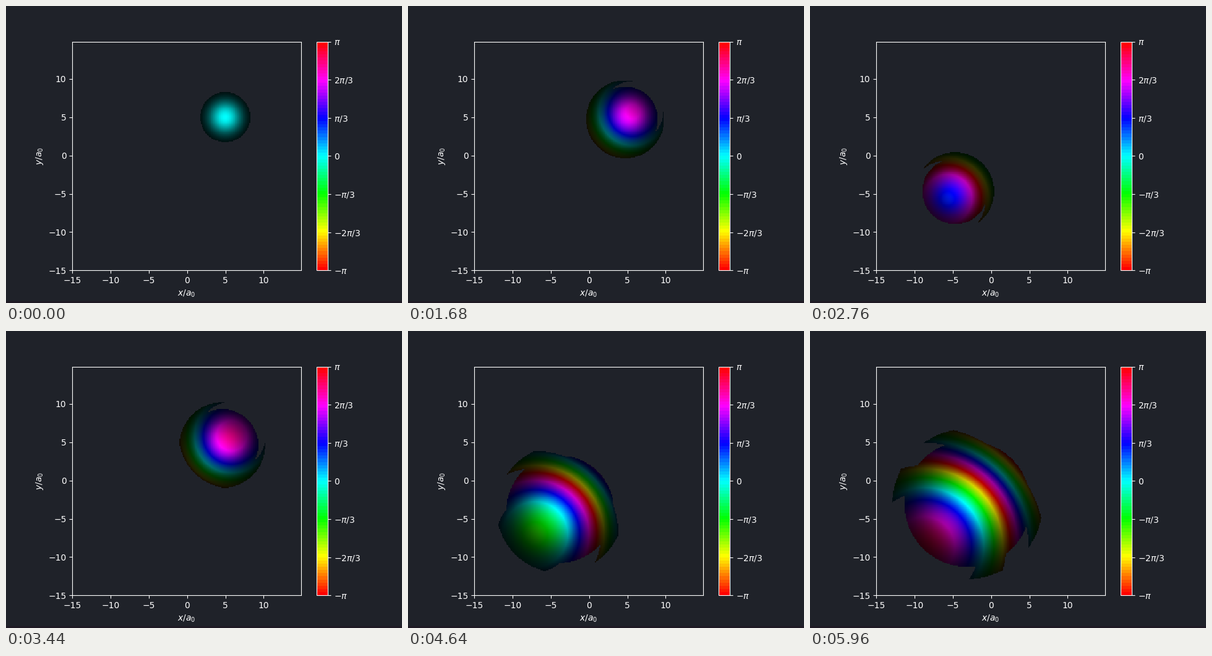
Animation of 640x480 px, one loop 6000 ms. Source, as a matplotlib script:

```python
import numpy as np
import matplotlib.pyplot as plt
from matplotlib.animation import FuncAnimation
from matplotlib.colors import ListedColormap
from matplotlib.patches import Rectangle

FRAMES, INTERVAL = 150, 40
BG = "#1f2229"

N, HALF = 256, 15.0
PERIOD = 44.4     # frames per oscillation
M_OMEGA = 0.134   # mass times angular frequency
WIDTH2 = 2.0      # squared width of the initial packet
START = 5.0       # initial x and y of the packet
KAPPA = 1 / (M_OMEGA * WIDTH2)

axis = np.linspace(-HALF, HALF, N, endpoint=False)
X, Y = np.meshgrid(axis, axis)


def hue_rgb(phase):
    """Phase to a saturated colour: 0 is cyan, +-pi is red."""
    h6 = (np.asarray(phase)[..., None] + np.pi) * 3 / np.pi
    return np.clip(np.abs((h6 + [0, 4, 2]) % 6 - 3) - 1, 0, 1)


def packet(i):
    """Modulus (peak 1) and phase of a squeezed state in a harmonic well."""
    theta = 2 * np.pi * i / PERIOD
    c, s = np.cos(theta), np.sin(theta)
    q, p = START * c, -M_OMEGA * START * s
    spread = c**2 + (KAPPA * s)**2
    curve = M_OMEGA * (KAPPA**2 - 1) * s * c / spread
    dx, dy = X - q, Y - q
    r2 = dx**2 + dy**2
    phase = p * q - np.angle(c + 1j * KAPPA * s) + p * (dx + dy) + curve * r2 / 2
    return np.exp(-r2 / (2 * WIDTH2 * spread)), phase


def render(i):
    mod, phase = packet(i)
    rgb = hue_rgb(phase)
    # dark green tones stay visible further out than red and blue ones
    cutoff = np.where(rgb[..., 1] > 0.6, 0.068, 0.15)
    return np.dstack([rgb * mod[..., None], mod > cutoff])


plt.style.use("dark_background")
plt.rcParams.update({"figure.facecolor": BG, "axes.facecolor": BG,
                     "savefig.facecolor": BG, "font.family": "DejaVu Sans"})

fig, ax = plt.subplots(figsize=(6.4, 4.8), dpi=100)
cmap = ListedColormap(hue_rgb(np.linspace(-np.pi, np.pi, 72)))
scale = plt.cm.ScalarMappable(plt.Normalize(-np.pi, np.pi), cmap)
image = ax.imshow(render(0), origin="lower", interpolation="nearest",
                  extent=(axis[0], axis[-1], axis[0], axis[-1]))
ax.set_xticks(range(-15, 11, 5))
ax.set_yticks(range(-15, 11, 5))
ax.set_xlabel("$x/a_0$")
ax.set_ylabel("$y/a_0$")

bar = fig.colorbar(scale, ax=ax)
bar.set_ticks(np.linspace(-np.pi, np.pi, 7),
              labels=[r"$-\pi$", r"$-2\pi/3$", r"$-\pi/3$", "$0$",
                      r"$\pi/3$", r"$2\pi/3$", r"$\pi$"])

fig.add_artist(Rectangle((0, 0), 1, 3 / 480, transform=fig.transFigure,
                         color="#1f1a24", lw=0))


def update(i):
    image.set_data(render(i))
    return [image]


anim = FuncAnimation(fig, update, frames=FRAMES, interval=INTERVAL,
                     repeat=True, repeat_delay=0, blit=False)
plt.show()
```
